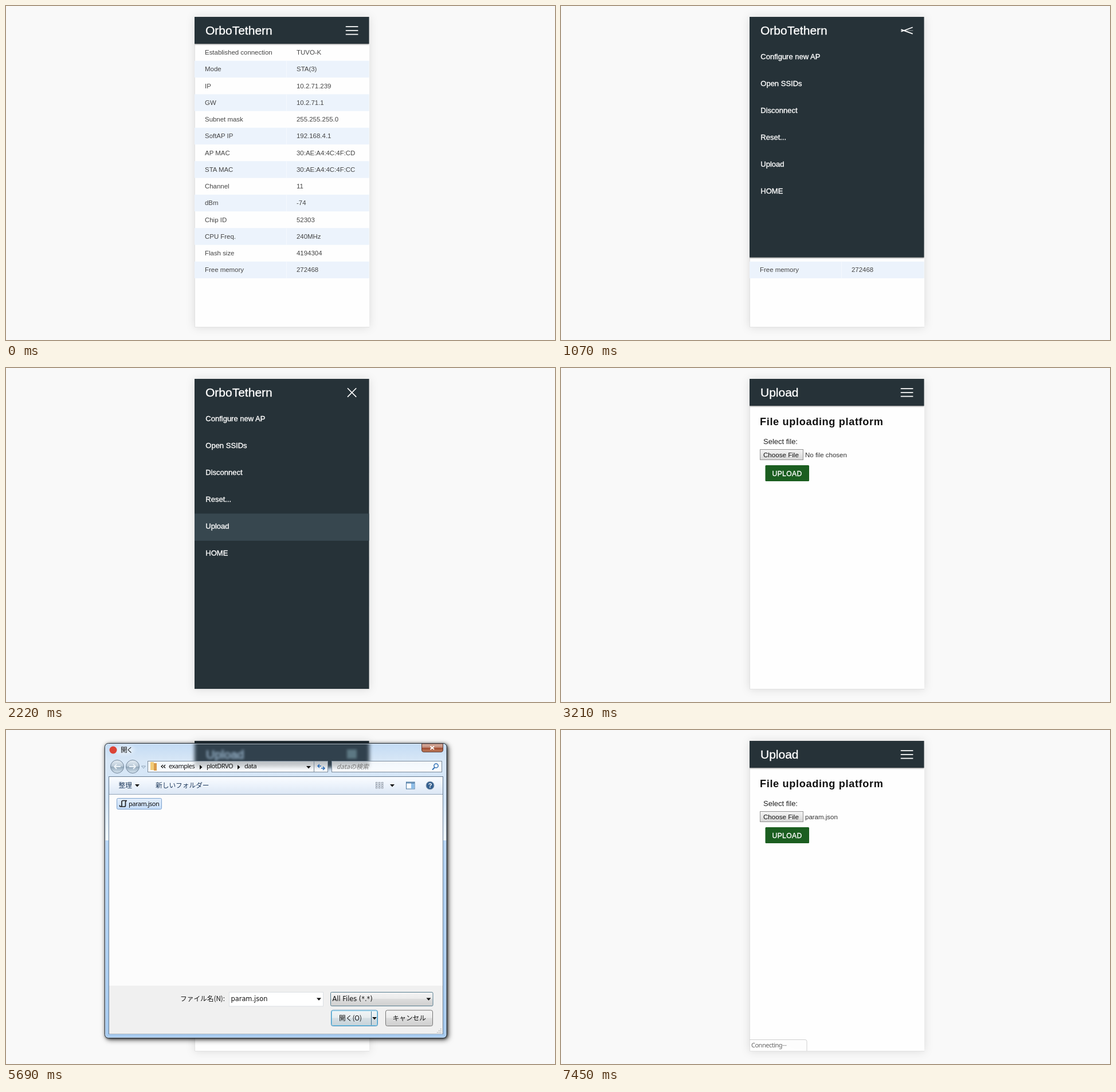
An HTML page for the animation above (8000 ms loop, 958 by 584 pixels).

```html
<!DOCTYPE html>
<html lang="en">
<head>
<meta charset="utf-8">
<title>File upload</title>
<style>
html, body { margin: 0; width: 100%; height: 100%; overflow: hidden; background: #f9f9f9; }
svg { display: block; width: 958px; height: 584px; }
text { font-family: "Liberation Sans", Arial, sans-serif; white-space: pre; }
.ui { font: 11px "Noto Sans", sans-serif; letter-spacing: -.5px; }
.jp { font: 11.7px "Noto Sans CJK JP", "Noto Sans CJK", sans-serif; }
.field { font: 11.4px "DejaVu Sans", sans-serif; }
.strong { stroke: #fff; stroke-width: .35px; }
.soft { filter: drop-shadow(0 1px 8px rgba(0,0,0,.12)); }
.bar { filter: drop-shadow(0 1px 1.2px rgba(0,0,0,.5)); }
.window { filter: drop-shadow(1px 1px 2px rgba(0,0,0,.6)) drop-shadow(2px 2px 4px rgba(0,0,0,.75)); }
.blur { filter: blur(3px); }
.haze { filter: blur(2px); }
</style>
</head>
<body>
<svg id="stage" viewBox="0 0 958 584"></svg>
<script>
const LOOP = 8000;

// Markup helpers
const text = (x, y, size, str, fill = '#fff', more = '') =>
  `<text x="${x}" y="${y}" font-size="${size}" fill="${fill}" ${more}>${str}</text>`;
const styled = (cls, x, y, str, fill = '#111', more = '') =>
  `<text class="${cls}" x="${x}" y="${y}" fill="${fill}" ${more}>${str}</text>`;
const rect = (x, y, w, h, fill, more = '') =>
  `<rect x="${x}" y="${y}" width="${w}" height="${h}" fill="${fill}" ${more}/>`;
const path = (d, stroke, width = 1, more = '') =>
  `<path d="${d}" fill="none" stroke="${stroke}" stroke-width="${width}" ${more}/>`;
const down = (x, y) => `<path d="M${x - 4} ${y - 2}h8l-4 4.5z" fill="#111"/>`;
const right = (x, y) => `<path d="M${x - 2} ${y - 4}v8l4.5 -4z" fill="#111"/>`;
const group = (id, body, more = '') => `<g id="${id}" ${more}>${body}</g>`;
const gradient = (id, ...stops) => `<linearGradient id="${id}" x2="0" y2="1">` +
  stops.map(([at, color, alpha = 1]) =>
    `<stop offset="${at}" stop-color="${color}" stop-opacity="${alpha}"/>`).join('') +
  '</linearGradient>';

const defs = `<defs>
  ${gradient('glass', [0, '#c3dbf4'], [.06, '#d8e7f6'], [.2, '#d3e6f9'], [.33, '#f0f7fd'], [.33, '#b6d5f5'], [1, '#a6caef'])}
  ${gradient('toolbar', [0, '#fafcff'], [.5, '#ebf2fb'], [1, '#dbe6f4'])}
  ${gradient('entry', [0, '#fff', .66], [1, '#fff', .88])}
  ${gradient('button', [0, '#f4f4f4'], [.48, '#ebebeb'], [.5, '#dddddd'], [1, '#cfcfcf'])}
  ${gradient('buttonHot', [0, '#eaf6fd'], [.48, '#d9f0fc'], [.5, '#bee6fd'], [1, '#a7d9f5'])}
  ${gradient('close', [0, '#dcb3a4'], [.45, '#c08a78'], [.5, '#a04a30'], [1, '#c08060'])}
  ${gradient('orb', [0, '#e6eef5'], [.5, '#b8c8d6'], [.52, '#93a8ba'], [1, '#d7e6f2'])}
  ${gradient('choose', [0, '#f5f5f5'], [1, '#d6d6d6'])}
  ${gradient('chooseHot', [0, '#fbfbfb'], [1, '#e3e3e3'])}
  ${gradient('selected', [0, '#e4effc'], [1, '#c4dcf8'])}
  <clipPath id="panel">${rect(329, 19, 304.6, 542, '#000')}</clipPath>
  <clipPath id="menuClip"><rect id="menuArea" x="329" y="19" width="305" height="47"/></clipPath>
  <clipPath id="frame">${rect(173, 24, 596, 57, '#000')}</clipPath>
</defs>`;

// Phone pages
const facts = [
  ['Established connection', 'TUVO-K'], ['Mode', 'STA(3)'], ['IP', '10.2.71.239'],
  ['GW', '10.2.71.1'], ['Subnet mask', '255.255.255.0'], ['SoftAP IP', '192.168.4.1'],
  ['AP MAC', '30:AE:A4:4C:4F:CD'], ['STA MAC', '30:AE:A4:4C:4F:CC'], ['Channel', '11'],
  ['dBm', '-74'], ['Chip ID', '52303'], ['CPU Freq.', '240MHz'],
  ['Flash size', '4194304'], ['Free memory', '272468']
];
const table = facts.map(([key, value], i) => {
  const top = 66.6 + 29.25 * i;
  const stripe = i % 2 ? rect(329, top, 305, 29.25, '#ecf3fc') + rect(489, top, 1, 29.25, '#f4f9fe') : '';
  return stripe + text(347, top + 18.4, 11.45, key, '#444') + text(507, top + 18.4, 11.45, value, '#444');
}).join('');

const items = ['Configure new AP', 'Open SSIDs', 'Disconnect', 'Reset...', 'Upload', 'HOME'];
const menu = rect(329, 254.5, 305, 47.5, '#37474f', 'id="hover"') +
  items.map((name, i) => text(348.3, 92.6 + 47 * i, 13, name, '#fff', 'class="strong"')).join('');

const form = text(347, 100, 18.2, 'File uploading platform', '#111', 'font-weight="bold" letter-spacing=".63"') +
  text(353, 132.6, 13, 'Select file:', '#222') +
  rect(347.5, 142.5, 75, 18, 'url(#choose)', 'id="chooser" stroke="#929292"') +
  text(353, 156, 11.6, 'Choose File', '#111') +
  text(426, 156, 11.5, 'No file chosen', '#333', 'id="chosen"') +
  rect(356.5, 170, 76.5, 28, '#1b5e20', 'rx="1.5"') +
  text(368.5, 188.5, 12.1, 'UPLOAD', '#fff', 'class="strong" letter-spacing=".4"');

const burger = ['top', 'middle', 'bottom'].map(id =>
  `<path id="${id}" d="M-10.8 0H10.8" stroke="#fff" stroke-width="1.7"/>`).join('');

const phone = rect(329, 19, 305, 542, '#fefefe', 'class="soft"') +
  path('M329.5 66V561.5H634', '#e2e2e2') +
  `<g clip-path="url(#panel)">` +
  group('table', table) + group('form', form) +
  rect(329, 19, 305, 47, '#263238', 'id="bar" class="bar"') +
  group('menu', menu, 'clip-path="url(#menuClip)"') +
  text(348, 50, 21, '', '#fff', 'id="title" class="strong"') + burger + '</g>' +
  group('status', path('M329 541.5H426Q429 541.5 429 544.5V561', '#d0d0d0', 1, 'style="fill:#fdfdfd"') +
    styled('ui', 332, 555, '', '#666', 'id="statusText"'));

// File dialog
const orb = x => `<circle cx="${x}" cy="64" r="11.5" fill="url(#orb)" stroke="#71859a"/>`;
const behind = `<g clip-path="url(#frame)"><g class="blur">` +
  rect(329, 5, 305, 61, '#31414d') + '</g><g class="haze" opacity=".75">' +
  text(349, 50, 21, 'Upload', '#a9c6de', 'stroke="#a9c6de"') + rect(595, 34, 17, 16, '#6b8a95') + '</g>' +
  '<ellipse class="blur" cx="206" cy="35" rx="18" ry="8" fill="#fff" opacity=".5"/></g>';

const addressBar = rect(247.5, 54.5, 314, 19, 'url(#entry)', 'stroke="#7d8c9b"') +
  path('M537.5 55V74', '#7d8c9b') +
  rect(252, 56, 6, 14, '#f1cb78') + rect(258, 58, 5, 13, '#d99b4a') +
  path('M274 61l-3 2.7 3 2.7M278 61l-3 2.7 3 2.7', '#111', 1.3) +
  styled('ui', 284, 67, 'examples') + right(340, 65) +
  styled('ui', 350, 67, 'plotDRVO') + right(406, 65) + styled('ui', 416, 67, 'data') + down(528, 65) +
  path('M544 63h6m-3 -3l-3 3 3 3M550 67h6m-3 -3l3 3 -3 3', '#2d6cb5', 1.5) +
  rect(568.5, 54.5, 192, 19, 'url(#entry)', 'stroke="#7d8c9b"') +
  styled('jp', 577, 67.5, 'dataの検索', '#777', 'style="font-size:11px;font-style:italic"') +
  `<circle cx="750.5" cy="62.5" r="3.6" fill="#fff" stroke="#2f6fb4" stroke-width="1.5"/>` +
  path('M748 65.5l-4 4', '#2f6fb4', 2);

const viewIcon = [646, 651, 656].map(x => [91.5, 95.5, 99.5].map(y =>
  rect(x - .5, y, 2.5, 2.5, '#fff', 'stroke="#8490a0" stroke-width=".8"')).join('')).join('');
const toolbar = rect(180, 82, 582, 30, 'url(#toolbar)', 'id="strip"') +
  path('M180 0H762', '#94a5b9', 1, 'id="stripLine"') +
  group('tools', styled('jp', 196.5, 101, '整理', '#1e395b') + down(229, 97) +
    styled('jp', 261, 101, '新しいフォルダー', '#1e395b') + viewIcon + down(674, 97)) +
  rect(698.5, 91, 14.5, 12, '#fff', 'stroke="#41729f"') + rect(707, 92, 5.5, 10.5, '#8dbde8') +
  path('M698 92.5h15', '#41729f', 1.5) +
  `<circle cx="740" cy="97" r="7" fill="#35608f" stroke="#98a9bb"/>` +
  text(740, 101, 11, '?', '#fff', 'font-weight="bold" text-anchor="middle"');

const file = group('file',
  rect(193.5, 119.5, 78, 19, 'url(#selected)', 'id="pick" rx="2" stroke="#7da2ce"') +
  path('M211 123.5h-7q-2 0 -2 2v6.5q0 2 -2 2h6.500q2 0 2 -2v-6q0 -2.5 2.5 -2.5M198.5 131.5q-.5 2.5 1.5 2.5', '#222', 1.7) +
  styled('ui', 214, 133, 'param.json'));

const footer = rect(180, 447, 582, 84.5, '#f0f0f0') +
  styled('jp', 304, 474, 'ファイル名(N):') +
  rect(389.5, 458.5, 164, 24.5, '#fff', 'id="entryBox" stroke="#86b5df"') + down(546, 470.5) +
  styled('field', 392.5, 474, 'param.json', '#111', 'id="entryText"') +
  rect(566.5, 458.5, 178.5, 24, 'url(#button)', 'id="types" rx="2" stroke="#747474"') +
  styled('field', 569.5, 474, 'All Files (*.*)') + down(737.5, 470.5) +
  rect(567.5, 490, 81, 27.5, 'url(#button)', 'rx="3" stroke="#3c7fb1"') +
  rect(567.5, 490, 81, 27.5, 'url(#buttonHot)', 'id="openHot" rx="3"') +
  rect(568.5, 491, 79, 25.5, 'none', 'rx="2" stroke="#5bc8ee" stroke-opacity=".75"') +
  styled('jp', 587, 508, '開く(O)', '#111', 'id="openText"') +
  group('split', path('M637.5 492V516', '#3f7391') + down(643, 504)) +
  rect(662.5, 490, 82, 27.5, 'url(#button)', 'rx="3" stroke="#747474"') +
  styled('jp', 674.5, 508, 'キャンセル') +
  [[758, 522], [755, 525], [758, 525], [752, 528], [755, 528], [758, 528]]
    .map(([x, y]) => rect(x, y, 1.5, 1.5, '#b4b4b4')).join('');

const dialog = rect(172.5, 23.5, 596.5, 515, 'url(#glass)', 'class="window" rx="6"') + behind +
  rect(173.5, 24.5, 594.5, 513, 'none', 'rx="5" stroke="#fff" stroke-opacity=".6"') +
  rect(172.5, 23.5, 596.5, 515, 'none', 'rx="6" stroke="#203040"') +
  `<circle cx="187" cy="35" r="6.5" fill="#db4437"/>` +
  styled('jp', 200, 39, '開く', '#111', 'letter-spacing="-1.5"') +
  path('M725.5 24V35Q725.5 38.5 729 38.5H759Q762.5 38.5 762.5 35V24Z', '#5c3a34', 1, 'style="fill:url(#close)"') +
  path('M740.5 28.5l6.5 5.5m0 -5.5l-6.5 5.5', '#fff', 2) +
  orb(194) + orb(221) +
  path('M200 64h-11m4 -4l-4 4 4 4M215 64h11m-4 -4l4 4 -4 4', '#eef4f9', 1.8) +
  path('M236.5 63l3.5 4 3.5 -4z', '#8fa4b8') +
  addressBar +
  rect(179.5, 81.5, 583, 450, '#fcfcfc', 'stroke="#667b91"') + toolbar + file + footer;

stage.innerHTML = defs + phone + group('dialog', dialog);
const part = Object.fromEntries([...stage.querySelectorAll('[id]')].map(e => [e.id, e]));

// Motion helpers
const clamp = v => Math.min(1, Math.max(0, v));
const hold = (t, start, step = 70) => start + Math.floor((t - start) / step) * step;
const show = (name, on) => { part[name].style.display = on ? '' : 'none'; };
const set = (name, attrs) => { for (const k in attrs) part[name].setAttribute(k, attrs[k]); };

// CSS "ease" curve, solved by bisection
function ease(x) {
  let lo = 0, hi = 1;
  const curve = (s, a, b) => 3 * (1 - s) ** 2 * s * a + 3 * (1 - s) * s * s * b + s ** 3;
  for (let i = 0; i < 24; i++) {
    const mid = (lo + hi) / 2;
    if (curve(mid, .25, .25) < x) lo = mid; else hi = mid;
  }
  return curve(lo, .1, 1);
}

function drawPhone(t) {
  const uploading = t >= 3210;
  const open = uploading || t < 860 ? 0 : ease(clamp((hold(t, 860) - 818) / 600));
  const height = 47 + 526 * open;
  show('table', !uploading);
  show('form', uploading);
  show('menu', open > 0);
  set('bar', { height });
  set('menuArea', { height });
  set('hover', { opacity: clamp((hold(t, 2080) - 2010) / 210) });
  part.title.textContent = uploading ? 'Upload' : 'OrboTethern';

  const gap = 6.7 * (1 - open), turn = 225 * open;
  set('top', { transform: `translate(603.6 ${42.9 - gap}) rotate(${turn})` });
  set('middle', { transform: 'translate(603.6 42.9)', opacity: 1 - open });
  set('bottom', { transform: `translate(603.6 ${42.9 + gap}) rotate(${-turn})` });

  const hot = t >= 4070 && t < 7050;
  set('chooser', { fill: hot ? 'url(#chooseHot)' : 'url(#choose)', stroke: hot ? '#777' : '#929292' });
  part.chosen.textContent = t < 5970 ? 'No file chosen' : 'param.json';

  const waiting = t >= 4205 && t < 5150;
  show('status', waiting || t >= 7450);
  part.statusText.textContent = waiting ? 'Waiting for icons.v···' : 'Connecting···';
}

function drawDialog(t) {
  const visible = t >= 4070 && t < 6320;
  show('dialog', visible);
  if (!visible) return;

  const entering = clamp((hold(t, 4070, 67.5) - 4070) / 270);
  const leaving = clamp((hold(t, 5690) - 6040) / 280);
  const shown = (1 - (1 - entering) ** 2) * (1 - leaving);
  const scale = .92 + .08 * shown;
  set('dialog', { opacity: shown, transform: `translate(470.5 281) scale(${scale}) translate(-470.5 -281)` });

  const ready = t >= 4475, picked = t >= 5220, split = t >= 4745;
  show('tools', ready);
  set('strip', { height: ready ? 31 : 29 });
  set('stripLine', { transform: `translate(0 ${ready ? 112.5 : 110.5})` });
  set('file', { transform: `translate(0 ${ready ? 0 : -2})` });
  set('pick', { opacity: picked ? 1 : .7 * clamp((hold(t, 4880) - 4810) / 210) });
  show('entryText', picked);
  set('entryBox', { stroke: picked ? '#dcdfe3' : '#86b5df' });
  show('split', split);
  set('openText', { x: split ? 581 : 587 });

  const pointer = t >= 5690;
  set('types', { stroke: pointer && t < 5830 ? '#587f91' : '#747474' });
  set('openHot', { opacity: pointer ? clamp((hold(t, 5690) - 5640) / 210) : 0 });
}

function frame(now) {
  const t = now % LOOP;
  drawPhone(t);
  drawDialog(t);
  requestAnimationFrame(frame);
}
frame(0);
</script>
</body>
</html>
```
